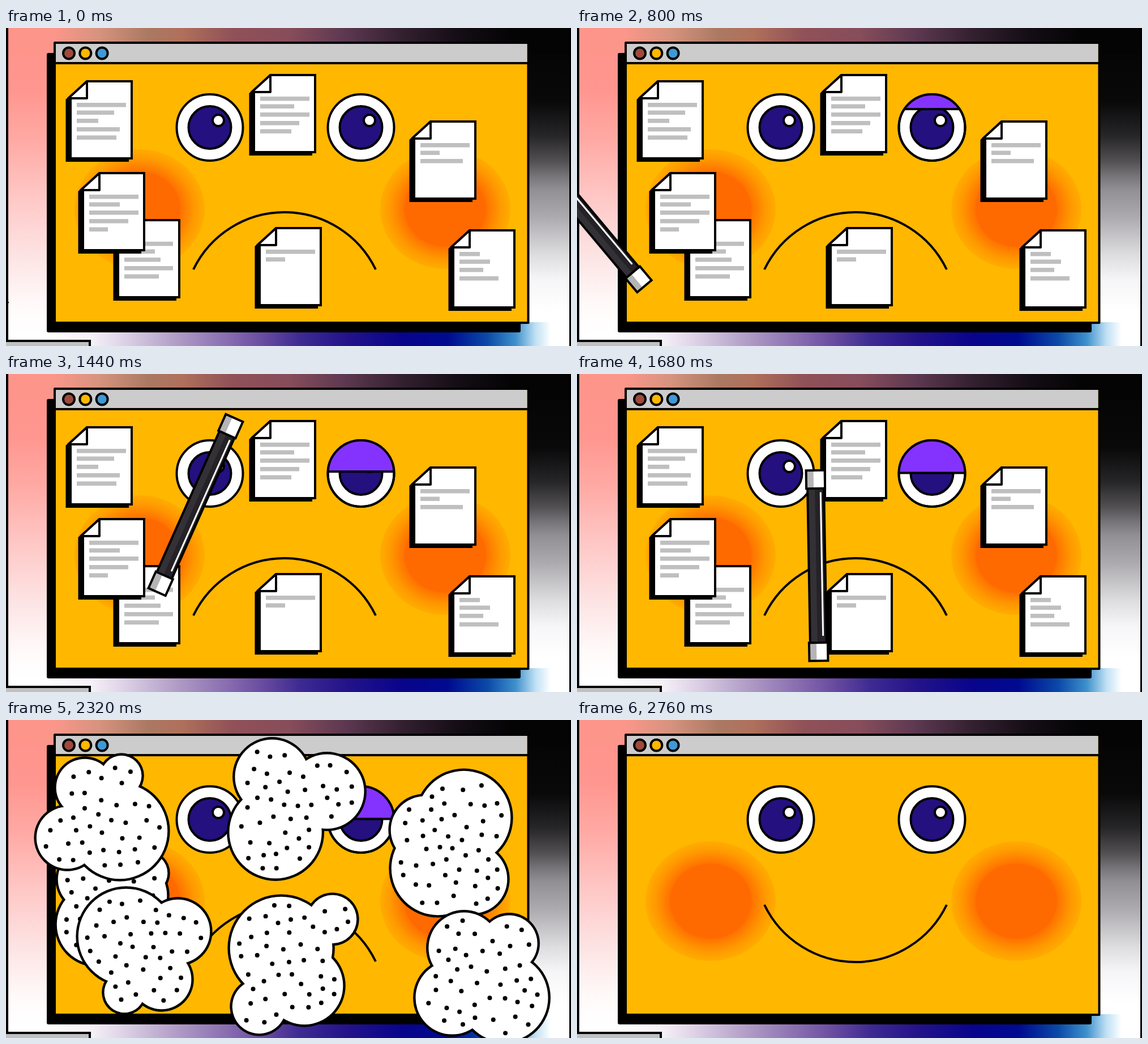
Recreate the animation shown at these times as an HTML page. Size 998 by 561 pixels, loop 4.8 s.

```html
<!DOCTYPE html>
<html lang="en">
<head>
<meta charset="utf-8">
<title>Tidy window</title>
<style>
  html, body { margin: 0; width: 100%; height: 100%; overflow: hidden; background: #fff; }
  svg { display: block; width: 100vw; height: 100vh; }
  .ink { stroke: #000; stroke-width: 4; }
</style>
</head>
<body>
<svg id="stage" viewBox="0 0 998 561" preserveAspectRatio="none"></svg>
<script>
const LOOP = 4800, STEP = 40, SWAP = 2600;
const stage = document.getElementById('stage');

// ---- drawing helpers ----
const rect = (x, y, w, h, fill, extra = '') =>
  `<rect x="${x}" y="${y}" width="${w}" height="${h}" fill="${fill}" ${extra}/>`;
const disc = (x, y, r, fill, extra = '') =>
  `<circle cx="${x}" cy="${y}" r="${r}" fill="${fill}" ${extra}/>`;
const poly = (points, fill, extra = '') =>
  `<polygon points="${points}" fill="${fill}" ${extra}/>`;
const INK = 'class="ink"';

// stops: "position colour, position colour, ..." with positions in pixels
function ramp(id, axis, stops) {
  const end = axis === 'x' ? 'x2="998" y2="0"' : 'x2="0" y2="561"';
  const size = axis === 'x' ? 998 : 561;
  const list = stops.split(',').map(s => {
    const [at, colour] = s.trim().split(' ');
    return `<stop offset="${at / size}" stop-color="${colour}"/>`;
  }).join('');
  return `<linearGradient id="${id}" gradientUnits="userSpaceOnUse" x1="0" y1="0" ${end}>${list}</linearGradient>`;
}

const defs = `<defs>
  ${ramp('top', 'x', '0 #ff948a, 85 #fb968a, 165 #d6937e, 250 #ab7963, 310 #b0705b, 400 #905158, 500 #874d5b, 600 #5c3850, 700 #33202f, 800 #140d15, 890 #050405')}
  ${ramp('left', 'y', '0 #ff948a, 110 #ff968f, 200 #ffaaa5, 300 #fec8c6, 400 #fde3e3, 490 #fffafa, 540 #fff')}
  ${ramp('right', 'y', '0 #040304, 130 #09090a, 190 #262527, 235 #525053, 262 #78757a, 285 #918f93, 335 #adabaf, 400 #dddde0, 445 #f6f6f8, 500 #fff')}
  ${ramp('bottom', 'x', '75 #fff, 150 #f6f1f8, 200 #e1d6e9, 300 #b19dc6, 400 #8468ae, 450 #6b4da1, 520 #3d2a92, 600 #24138a, 700 #08048b, 780 #000a90, 850 #0a49a8, 900 #3d90cc, 935 #bfe0f4, 962 #fff')}
  <radialGradient id="blush">
    <stop offset=".62" stop-color="#ff6a00"/><stop offset=".64" stop-color="#ff7400"/>
    <stop offset=".85" stop-color="#ff9a00"/><stop offset="1" stop-color="#ffac00"/>
  </radialGradient>
  <clipPath id="eyeClip">${disc(627, 175.5, 58.5, '#000')}</clipPath>
</defs>`;

const backdrop =
  rect(0, 0, 998, 561, '#fff') +
  rect(0, 0, 90, 561, 'url(#left)') +
  rect(915, 0, 83, 540, 'url(#right)') +
  rect(0, 0, 998, 46, 'url(#top)') +
  rect(75, 519, 923, 42, 'url(#bottom)') +
  rect(0, 0, 4, 561, '#000') + rect(995, 0, 3, 561, '#000') +
  rect(-10, 552, 158, 30, '#c0c0c0', INK);

const panel =
  rect(72, 44, 837, 493, '#000', 'rx="3"') +
  rect(86, 26, 836.5, 494, '#ffb700', INK + ' stroke-linejoin="round"') +
  rect(88, 28, 832.5, 33, '#ccc') + rect(86, 60, 836, 4, '#000') +
  ['#9e4a3d', '#ffb700', '#4099d5'].map((c, i) => disc(111 + i * 29.3, 44.5, 10, c, INK)).join('');

const cheek = x => `<ellipse cx="${x}" cy="319.5" rx="115" ry="105.5" fill="url(#blush)"/>`;
const eye = x =>
  disc(x, 175.5, 58.5, '#fff', INK) + disc(x, 175.5, 37.5, '#24107f', INK) +
  disc(x + 15, 163, 10, '#fff', INK);

const face = cheek(236) + cheek(776) + eye(360) + eye(627) +
  `<g id="lid"><g clip-path="url(#eyeClip)"><rect id="lidFill" x="560" y="56" width="134" height="60" fill="#8433ff" class="ink"/></g>
   ${disc(627, 175.5, 58.5, 'none', INK)}</g>
   <path id="mouth" fill="none" class="ink"/>`;

// ---- sheets: x, y, then line widths ----
const rows = [40, 53.5, 68, 83, 97.5];
const sheets = [
  [105, 92, 87, 66, 38, 76, 70],
  [429, 81, 87, 60, 87, 69, 55],
  [712, 163, 87, 34, 75],
  [189, 337, 86, 54, 64, 86, 61],
  [127, 254, 87, 54, 87, 69, 33],
  [439, 351, 87, 34],
  [781, 355, 36, 54, 42, 69]
];
const sheet = ([x, y, ...widths]) => `<g transform="translate(${x} ${y})">` +
  poly('.5,34 14,22 14,136 112,136 112,144 .5,144', '#000') +
  poly('38,2 117,2 117,138 9,138 9,29', '#fff', INK) +
  poly('38,2 38,32 5,32', '#fff', INK + ' stroke-linejoin="round"') +
  widths.map((w, i) => rect(20, rows[i], w, 7.5, '#bfbfbf')).join('') + '</g>';

// ---- wand, upright around its middle ----
const cap = y => rect(-16.5, y, 33, 32, '#fff') + rect(-16.5, y, 13, 32, '#b5b5b5') +
  rect(-16.5, y, 33, 32, 'none', INK);
const wand = '<g id="wand">' +
  rect(-14.5, -140, 29, 280, '#242226') + rect(-14.5, -140, 13, 280, '#333135') +
  rect(-14.5, -140, 29, 280, 'none', INK) +
  '<path d="M8.5 -128V123" stroke="#fff" stroke-width="3" stroke-linecap="round"/>' +
  cap(-168) + cap(136) + '</g>';

// ---- clouds: centre, size against the full puff, delay, lobes as x y r ----
const clouds = [
  { c: [198, 312], size: .755, lobes: '146 281 57, 250 270 38, 215 310 72, 160 361 73' },
  { c: [173, 170], size: .755, lobes: '139 119 53, 204 98 38, 201 196 87, 108 208 57' },
  { c: [242, 402], size: .755, lobes: '212 382 87, 304 373 59, 275 458 55, 209 481 38' },
  { c: [507, 433], size: .755, lobes: '486 402 93, 577 351 45, 527 469 71, 447 506 50' },
  { c: [785, 219], size: .755, lobes: '809 172 85, 739 194 62, 763 262 85, 825 281 63' },
  { c: [839, 455], size: .668, delay: 28, lobes: '809 402 65, 889 394 52, 788 490 67, 880 490 80' },
  { c: [514, 163], size: .668, delay: 28, lobes: '470 100 68, 567 126 68, 476 198 84' }
];

let seed = 11;
const random = () => (seed = (seed * 16807) % 2147483647) / 2147483647;

function speckle(lobes) {
  const dots = [];
  const inside = (x, y) => lobes.some(([a, b, r]) => Math.hypot(x - a, y - b) < r - 16);
  const [x0, x1, y0, y1] = [
    Math.min(...lobes.map(l => l[0] - l[2])), Math.max(...lobes.map(l => l[0] + l[2])),
    Math.min(...lobes.map(l => l[1] - l[2])), Math.max(...lobes.map(l => l[1] + l[2]))];
  for (let i = 0; i < 2500; i++) {
    const x = x0 + random() * (x1 - x0), y = y0 + random() * (y1 - y0);
    if (inside(x, y) && dots.every(d => Math.hypot(x - d[0], y - d[1]) > 22)) dots.push([x, y]);
  }
  return dots.map(([x, y]) => disc(x.toFixed(1), y.toFixed(1), 4, '#000')).join('');
}

function cloud({ lobes }) {
  const list = lobes.split(', ').map(s => s.split(' ').map(Number));
  const layer = (grow, fill) => list.map(([x, y, r]) => disc(x, y, r + grow, fill)).join('');
  return '<g class="cloud">' + layer(2.2, '#000') + layer(-2.2, '#fff') + speckle(list) + '</g>';
}

stage.innerHTML = defs + backdrop + panel + face +
  '<g id="sheets">' + sheets.map(sheet).join('') + '</g>' +
  wand + clouds.map(cloud).join('');

// ---- motion ----
const $ = id => document.getElementById(id);
const lid = $('lid'), lidFill = $('lidFill'), mouth = $('mouth'), papers = $('sheets'), stick = $('wand');
const puffs = [...document.querySelectorAll('.cloud')];
const show = (el, on) => el.setAttribute('visibility', on ? 'visible' : 'hidden');
const clamp = v => Math.max(0, Math.min(1, v));

// time, x, y, angle
const path = [
  [480, -118, 366, -40],
  [640, -78, 354, -40],
  [800, 11, 327, -40],
  [920, 205, 268, 5],
  [1000, 290, 246, 22],
  [1120, 306, 229, 25],
  [1280, 315, 227, 25],
  [1440, 335, 231, 24],
  [1560, 369, 243, 20],
  [1680, 424, 338, -1],
  [1800, 440, 381, -6],
  [1960, 444, 385, -7]
];

// fall-off of the puffs: time, scale
const fade = [[2480, 1.05], [2560, 1], [2620, .94], [2680, .835], [2720, .5], [2760, 0]];

// smooth curve through the keys that never overshoots them
function along(keys, t, n) {
  const last = keys.length - 1;
  if (t <= keys[0][0]) return keys[0][n];
  if (t >= keys[last][0]) return keys[last][n];
  const i = keys.findIndex(k => k[0] > t) - 1;
  const slope = j => (keys[j + 1][n] - keys[j][n]) / (keys[j + 1][0] - keys[j][0]);
  const tangent = j => {
    if (j === 0 || j === last) return 0;
    const a = slope(j - 1), b = slope(j);
    return a * b <= 0 ? 0 : 2 * a * b / (a + b);
  };
  const span = keys[i + 1][0] - keys[i][0], u = (t - keys[i][0]) / span;
  const u2 = u * u, u3 = u2 * u;
  return (2 * u3 - 3 * u2 + 1) * keys[i][n] + (u3 - 2 * u2 + u) * span * tangent(i) +
    (3 * u2 - 2 * u3) * keys[i + 1][n] + (u3 - u2) * span * tangent(i + 1);
}

function puffScale(t, delay = 0) {
  const u = clamp((t - 2120 - delay) / 360);
  return Math.min(1.05 * (1 - (1 - u) ** 1.55), along(fade, t, 1));
}

function draw(t) {
  const happy = t >= SWAP;
  show(papers, !happy);
  mouth.setAttribute('d', happy
    ? 'M331 326A178.8 178.8 0 0 0 653 326'
    : 'M331 426A178.8 178.8 0 0 1 653 426');

  const drop = 1 - (1 - clamp((t - 480) / 1200)) ** 2;
  show(lid, !happy && drop > 0);
  lidFill.setAttribute('height', 60 + 58.5 * drop);

  show(stick, t < 2200);
  const [x, y, angle] = [1, 2, 3].map(n => along(path, t, n));
  stick.setAttribute('transform', `translate(${x} ${y}) rotate(${angle})`);

  clouds.forEach(({ c: [cx, cy], size, delay }, i) => {
    const k = puffScale(t, delay) / size;
    show(puffs[i], k > .001);
    puffs[i].setAttribute('transform', `translate(${cx} ${cy}) scale(${k}) translate(${-cx} ${-cy})`);
  });
}

const start = performance.now();
function tick() {
  const t = (performance.now() - start) % LOOP;
  draw(Math.floor(t / STEP) * STEP);
  requestAnimationFrame(tick);
}
tick();
</script>
</body>
</html>
```
